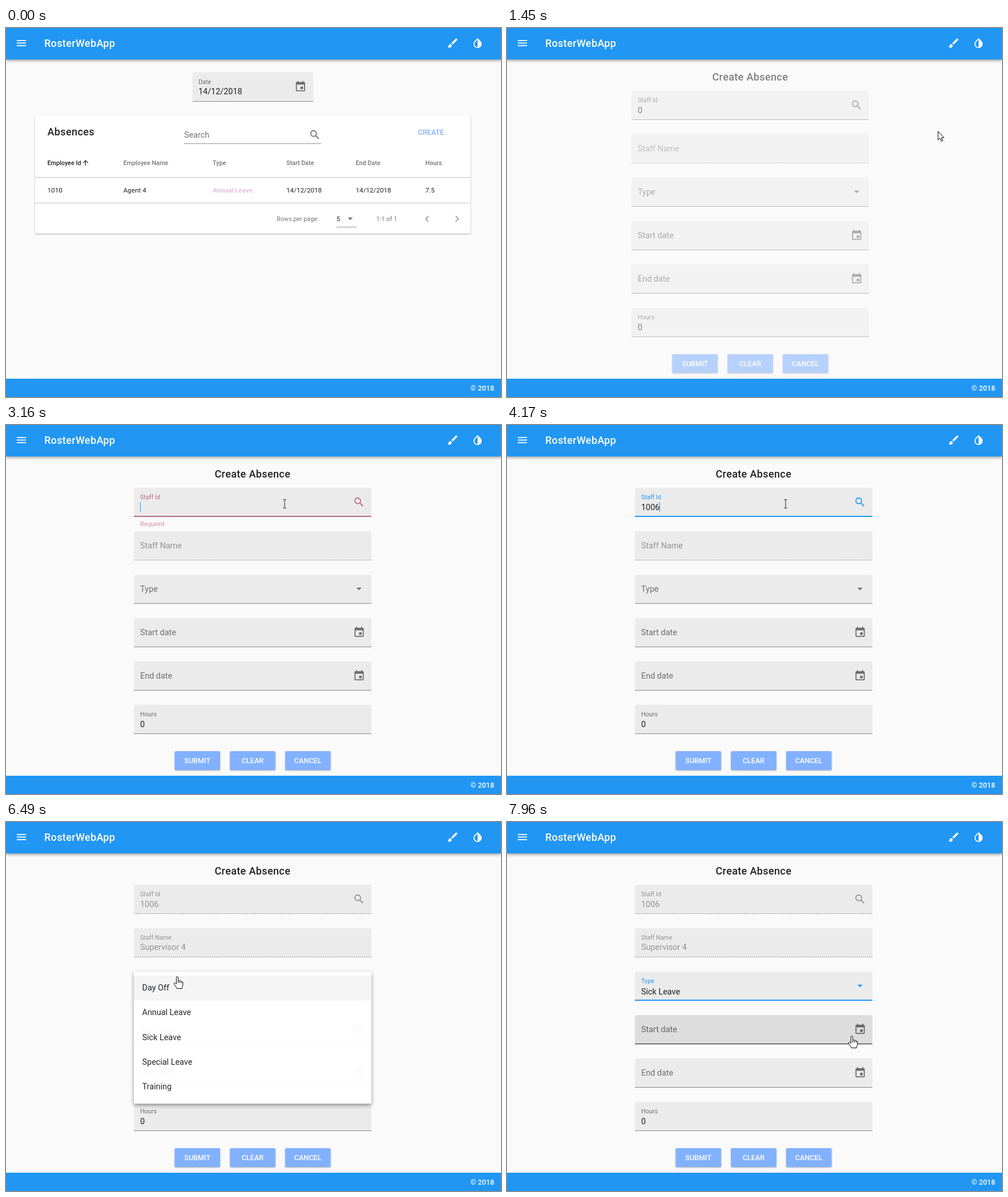
These frames come from a looping animation (867 px wide and 646 px high, 8000 ms). An HTML page:

```html
<!DOCTYPE html>
<html lang="en">
<head>
<meta charset="utf-8">
<title>RosterWebApp</title>
<style>
html, body { margin: 0; width: 100%; height: 100%; overflow: hidden; background: #fafafa; }
svg { display: block; width: 867px; height: 646px; font-family: Roboto, "Open Sans", Arial, sans-serif; }
text { white-space: pre; }
.t10 { font-size: 10.8px; }
.t11 { font-size: 11.7px; }
.t12 { font-size: 12.6px; }
.t14 { font-size: 14.4px; }
.t18 { font-size: 18px; letter-spacing: .02em; }
.med { font-weight: 500; }
.mid { text-anchor: middle; }
.ink { fill: rgba(0,0,0,.87); }
.soft { fill: rgba(0,0,0,.54); }
.dim { fill: rgba(0,0,0,.38); }
.line { fill: rgba(0,0,0,.42); }
.box { fill: rgba(0,0,0,.06); }
.white { fill: #fff; }
.bar { fill: #2196f3; }
.accent { fill: #82b1ff; }
.tint { fill: currentColor; }
.grow { transform-box: fill-box; transform-origin: center; }
.dots { stroke: rgba(0,0,0,.42); stroke-dasharray: 1.8 1.8; }
.raised { filter: drop-shadow(0 1px 1px rgba(0,0,0,.32)); }
.top { filter: drop-shadow(0 2px 2.5px rgba(0,0,0,.4)); }
.float { filter: drop-shadow(0 3px 3.5px rgba(0,0,0,.42)); }
.outline { fill: #fff; stroke: #000; stroke-linejoin: round; }
</style>
</head>
<body>
<svg id="stage" viewBox="0 0 867 646"></svg>
<style id="motion"></style>
<script>
const LOOP = 8000;
const BLUE = '#2196f3', RED = '#ff5252';
const SOFT = 'rgba(0,0,0,.54)', DIM = 'rgba(0,0,0,.38)';

const icons = {
  menu: 'M3 18h18v-2H3zm0-5h18v-2H3zm0-7v2h18V6z',
  brush: 'M7 14c-1.66 0-3 1.34-3 3 0 1.31-1.16 2-2 2 .92 1.22 2.49 2 4 2 2.21 0 4-1.79 4-4 0-1.66-1.34-3-3-3zm13.71-9.37l-1.34-1.34c-.39-.39-1.02-.39-1.41 0L9 12.25 11.75 15l8.96-8.96c.39-.39.39-1.02 0-1.41z',
  invert: 'M17.66 7.93L12 2.27 6.34 7.93a8 8 0 1 0 11.32 0zM12 19.59a6 6 0 0 1-4.24-10.24L12 5.1z',
  event: 'M17 12h-5v5h5zM16 1v2H8V1H6v2H5a2 2 0 0 0-2 2v14a2 2 0 0 0 2 2h14a2 2 0 0 0 2-2V5a2 2 0 0 0-2-2h-1V1zm3 18H5V8h14z',
  search: 'M15.5 14h-.79l-.28-.27A6.5 6.5 0 1 0 13.73 14.43l.27.28v.79l5 4.99L20.49 19zm-6 0a4.5 4.5 0 1 1 0-9 4.5 4.5 0 0 1 0 9z',
  up: 'M4 12l1.41 1.41L11 7.83V20h2V7.83l5.58 5.59L20 12l-8-8z',
  down: 'M7 10l5 5 5-5z',
  prev: 'M15.41 7.41L14 6l-6 6 6 6 1.41-1.41L10.83 12z',
  next: 'M10 6L8.59 7.41 13.17 12l-4.58 4.59L10 18l6-6z'
};

const text = (x, y, s, cls, attr = '') => `<text x="${x}" y="${y}" class="${cls}" ${attr}>${s}</text>`;
const rect = (x, y, w, h, cls, attr = '') =>
  `<rect x="${x}" y="${y}" width="${w}" height="${h}" class="${cls}" ${attr}/>`;
const icon = (name, cx, cy, cls, size = 21.6) => {
  const k = size / 24;
  return `<path d="${icons[name]}" class="${cls}" transform="translate(${cx - size / 2} ${cy - size / 2}) scale(${k})"/>`;
};
const group = (id, ...parts) => `<g id="${id}">${parts.join('')}</g>`;

const FX = 224, FW = 416, TX = 235;
const box = (x, y, w) =>
  `<path class="box" d="M${x} ${y + 51}v-47.4a3.6 3.6 0 0 1 3.6-3.6h${w - 7.2}a3.6 3.6 0 0 1 3.6 3.6v47.4z"/>`;
const under = y => rect(FX, y + 50, FW, 1, 'line');
const dots = y => `<path class="dots" d="M${FX} ${y + 50.5}h${FW}"/>`;
const hover = (id, y) => group(id, box(FX, y, FW), rect(FX, y + 50, FW, 1, 'ink'));
const focus = (id, y) => rect(FX, y + 49, FW, 2, 'tint grow', `id="${id}"`);
const button = (x, s) =>
  rect(x, 571, 79.5, 33, 'accent raised', 'rx="1.8"') + text(x + 39.7, 592, s, 't12 med white mid');

function listView() {
  const cols = [72.5, 205.5, 362, 491, 612.5, 734.5];
  const heads = ['Employee Id', 'Employee Name', 'Type', 'Start Date', 'End Date', 'Hours'];
  const row = ['1010', 'Agent 4', 'Annual Leave', '14/12/2018', '14/12/2018', '7.5'];
  return group('list',
    box(326.5, 77.5, 211.5), rect(326.5, 128, 211.5, 1, 'line'),
    text(337, 98, 'Date', 't10 soft'), text(337, 116, '14/12/2018', 't14 ink'),
    icon('event', 515.8, 102.6, 'soft'),
    rect(51, 153, 762.5, 207, 'white raised', 'rx="1.8"'),
    text(72.5, 188, 'Absences', 't18 med ink'),
    text(312, 192, 'Search', 't14 soft'), rect(312, 202, 240, 1, 'line'),
    icon('search', 541, 187, 'soft'),
    text(721.5, 186.5, 'CREATE', 't12 med accent'),
    heads.map((s, i) => text(cols[i], 240, s, 't10 med ' + (i ? 'soft' : 'ink'))).join(''),
    icon('up', 139.3, 236, 'ink', 14.4),
    row.map((s, i) => text(cols[i], 288, s, 't11 ink', i === 2 ? 'style="fill:#dda0dd"' : '')).join(''),
    rect(51, 261, 762.5, 1, '', 'fill="#c2c2c2"'), rect(51, 306, 762.5, 1, '', 'fill="#c2c2c2"'),
    text(474, 338, 'Rows per page:', 't10 soft'), text(579, 338, '5', 't10 ink'),
    icon('down', 603, 333.5, 'soft'), rect(579, 348, 35, 1, 'line'),
    text(648.5, 338, '1-1 of 1', 't10 soft'),
    icon('prev', 737.5, 334, 'dim'), icon('next', 790, 334, 'dim'));
}

function formView() {
  const typed = ['0', '1', '10', '100', '1006'];
  const options = ['Day Off', 'Annual Leave', 'Sick Leave', 'Special Leave', 'Training'];
  const optY = i => 268.7 + 43.2 * i;
  return group('form',
    text(365.5, 92, 'Create Absence', 't18 med ink'),
    // staff id
    box(FX, 110, FW), group('idLine', under(110)), group('idDots', dots(110)), hover('idHover', 110),
    group('idTint', text(TX, 130, 'Staff Id', 't10 tint'), icon('search', 618.3, 135, 'tint'),
      focus('idFocus', 110), text(TX, 177, 'Required', 't10 tint', 'id="error"')),
    typed.map((s, i) => text(TX, 148.5, s, 't14 ink', `id="v${i}"`)).join(''),
    group('caretPos', rect(TX, 135, 1, 17, 'bar', 'id="caret"')),
    // staff name
    box(FX, 186, FW), dots(186),
    group('nameLabel', text(0, 0, 'Staff Name', 't14 dim')),
    text(TX, 224.3, 'Supervisor 4', 't14 dim', 'id="name"'),
    // type
    box(FX, 262, FW), under(262),
    group('typeTint', group('typeLabel', text(0, 0, 'Type', 't14 tint')),
      icon('down', 618.3, 286.5, 'tint'), focus('typeFocus', 262)),
    text(TX, 302, 'Sick Leave', 't14 ink', 'id="type"'),
    // dates
    [['Start date', 338], ['End date', 414]].map(([s, y]) =>
      box(FX, y, FW) + under(y) + (y === 338 ? hover('dateHover', y) : '') +
      text(TX, y + 29.5, s, 't14 soft') + icon('event', 618.5, y + 25, 'soft')).join(''),
    // hours
    box(FX, 490, FW), under(490), text(TX, 510, 'Hours', 't10 soft'), text(TX, 528.5, '0', 't14 ink'),
    button(295.5, 'SUBMIT'), button(392.3, 'CLEAR'), button(489, 'CANCEL'),
    group('menu', rect(FX, 262, FW, 231, 'white float', 'rx="1.8"'),
      [0, 1, 2].map(i => rect(FX, optY(i), FW, 43.2, '', `id="o${i}" fill="#000" fill-opacity=".04"`)).join(''),
      options.map((s, i) => text(238.5, optY(i) + 26.5, s, 't14 ink')).join('')));
}

const chrome =
  rect(0, -6, 867, 61, 'bar top') + icon('menu', 27, 26.4, 'white') +
  text(67, 32.6, 'RosterWebApp', 't18 med white') +
  icon('brush', 782.5, 26.4, 'white') + icon('invert', 826, 26.4, 'white') +
  rect(0, 614, 867, 32, 'bar') + text(813.5, 635, '© 2018', 't12 med white');

const cursor = group('cursor',
  '<path id="arrow" class="outline" d="M0 0v15.2l3.6-3.4 2.4 5.5 2.3-1-2.4-5.3h4.6z"/>',
  '<path id="beam" fill="none" stroke="#222" d="M-3-7.5h2.2l.8.8.8-.8h2.2M0-7V7M-3 7.5h2.2l.8-.8.8.8h2.2"/>',
  '<path id="hand" class="outline" d="M-1.6 1.4a1.6 1.6 0 0 1 3.2 0v6.1c.4-1.4 2.8-1.3 3 .4.5-1.1 2.6-.9 2.8.8.6-.8 2.4-.4 2.4 1.3v4c0 2.5-1.6 3.5-1.6 6.5h-9C-1 18-5.8 13.6-5.8 11.8c0-1.8 2-1.9 4.2.7zM1.6 7.5V11M4.6 8V11M7.4 9v2.2"/>');

document.getElementById('stage').innerHTML = listView() + formView() + chrome + cursor;

// Motion: stops are [ms, declarations]; the first and last values extend to the loop ends.
let css = '';
function move(id, stops, ease = 'linear') {
  const all = [[0, stops[0][1]], ...stops, [LOOP, stops[stops.length - 1][1]]];
  css += `@keyframes ${id}{${all.map(([t, d]) => `${t / LOOP * 100}%{${d}}`).join('')}}` +
    `#${id}{animation:${id} ${LOOP}ms ${ease} infinite}`;
}
// Hard on/off: visible inside each [from, to) span.
const show = (id, ...spans) => move(id, [[0, 'opacity:0'],
  ...spans.flatMap(([a, b]) => [[a, 'opacity:1'], [b, 'opacity:0']])].filter(([t]) => t < LOOP), 'step-end');
// Soft changes: [start, end, value] segments after a first value.
function blend(id, prop, first, ...segs) {
  const stops = [[0, `${prop}:${first}`]];
  for (const [a, b, v] of segs) stops.push([a, stops[stops.length - 1][1]], [b, `${prop}:${v}`]);
  move(id, stops, 'cubic-bezier(.25,.8,.5,1)');
}
const at = (x, y, k = 1) => `translate(${x}px,${y}px) scale(${k})`;

move('list', [[1060, 'opacity:1;transform:none'], [1230, 'opacity:0;transform:translateX(-12px)']]);
move('form', [[0, 'opacity:0;transform:translateX(-15px)'], [1370, 'opacity:.15;transform:translateX(-12px)'],
  [1450, 'opacity:.56;transform:translateX(-6px)'], [1580, 'opacity:.93;transform:translateX(-1px)'],
  [1660, 'opacity:1;transform:none']], 'step-end');

blend('idHover', 'opacity', 0, [1760, 1960, 1], [2230, 2500, 0]);
blend('idTint', 'color', SOFT, [2230, 2500, BLUE], [3090, 3320, RED], [3470, 3700, BLUE], [5490, 5720, DIM]);
blend('idFocus', 'transform', 'scaleX(0)', [2230, 2540, 'scaleX(1)'], [5490, 5500, 'scaleX(0)']);
blend('error', 'opacity', 0, [3090, 3320, 1], [3470, 3700, 0]);
show('idLine', [0, 5490]);
show('idDots', [5490, LOOP]);

const keys = [3470, 3630, 3860, 4130];
show('v0', [0, 3090]);
show('v1', [keys[0], keys[1]]);
show('v2', [keys[1], keys[2]]);
show('v3', [keys[2], keys[3]]);
move('v4', [[0, 'opacity:0'], [keys[3], 'opacity:1'], [5490, 'opacity:.44']], 'step-end');
show('caret', [2270, 2770], [3090, 4630], [5130, 5490]);
const caretX = n => `transform:translateX(${Math.round(8.1 * n)}px)`;
move('caretPos', [[0, caretX(1)], [3090, caretX(0)], ...keys.map((t, i) => [t, caretX(i + 1)])], 'step-end');

blend('nameLabel', 'transform', at(TX, 215.5), [5360, 5660, at(TX, 206, .75)]);
show('name', [5400, LOOP]);

blend('menu', 'opacity', 0, [6330, 6560, 1], [7500, 7800, 0]);
show('o0', [6400, 6940]);
show('o1', [6940, 7180]);
show('o2', [7180, LOOP]);
blend('typeTint', 'color', SOFT, [6330, 6600, BLUE]);
blend('typeFocus', 'transform', 'scaleX(0)', [6330, 6600, 'scaleX(1)']);
blend('typeLabel', 'transform', at(TX, 291.5), [7530, 7800, at(TX, 282, .75)]);
show('type', [7530, LOOP]);
blend('dateHover', 'opacity', 0, [7720, 7940, 1]);

const path = [
  [210, 786, 650], [600, 778, 400], [850, 747, 188], [930, 741, 167], [990, 755, 181],
  [1580, 755, 181], [1700, 682, 164], [1840, 545, 142], [1990, 488, 138],
  [4630, 488, 138], [4850, 550, 142], [5150, 611, 141], [5950, 611, 141],
  [6130, 470, 205], [6320, 300, 271], [6790, 300, 271],
  [7100, 286.5, 359], [7180, 286.5, 359], [7270, 290, 374], [7600, 290, 374],
  [7780, 450, 377], [7940, 604, 375]
];
move('cursor', path.map(([t, x, y]) => [t, `transform:${at(x, y)}`]));
show('arrow', [210, 840], [1370, 1730], [5490, 6295]);
show('beam', [1730, 5120]);
show('hand', [840, 1370], [5120, 5490], [6295, LOOP]);

document.getElementById('motion').textContent = css;
</script>
</body>
</html>
```
